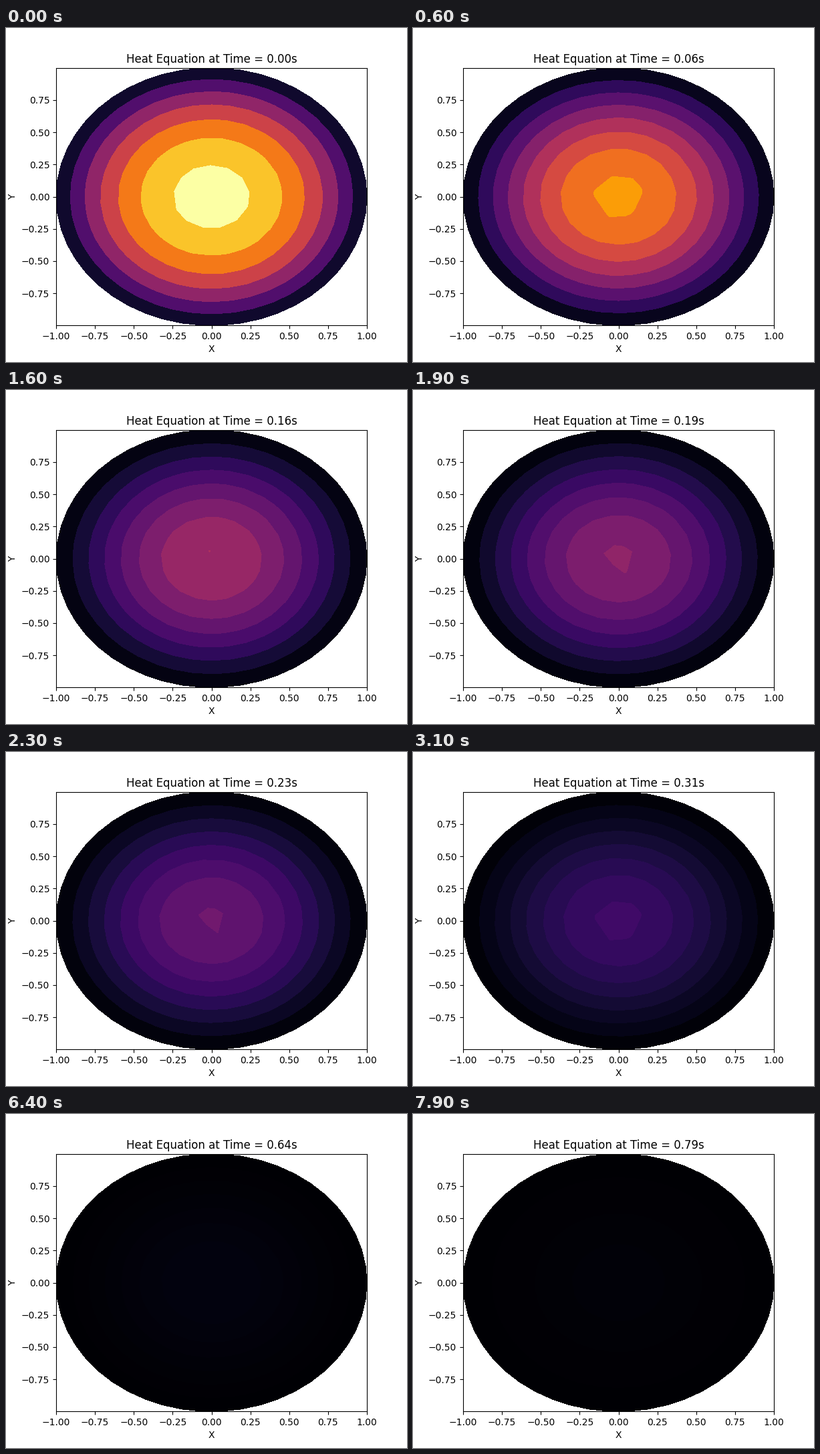
Recreate the animation shown at these times as a matplotlib script. Size 600 by 500 pixels, loop 8000 ms.

```python
import numpy as np
import matplotlib.pyplot as plt
from matplotlib.animation import FuncAnimation
from matplotlib.tri import Triangulation

DT = 0.01
STEPS = 80
RINGS = 8
STIFFNESS = 0.0053  # relative excess of the discrete first eigenvalue

THETA = (np.arange(200) + 0.5) * np.pi / 200


def bessel0(x):
    return np.cos(np.multiply.outer(x, np.sin(THETA))).mean(axis=-1)


def bessel1(x):
    s = np.sin(THETA)
    return (s * np.sin(np.multiply.outer(x, s))).mean(axis=-1)


def ring(radius, count, phase):
    a = phase + 2 * np.pi * np.arange(count) / count
    return radius * np.column_stack([np.cos(a), np.sin(a)])


def disk_points(rng):
    core = [(-0.015, 0.06), (0.045, -0.107), (0.125, 0.052), (0.09, 0.14),
            (-0.043, 0.172), (-0.14, 0.03), (-0.054, -0.147)]
    parts = [np.array(core)]
    for k in range(2, RINGS):
        count = round(2 * np.pi * k)
        pts = ring(k / RINGS, count, rng.uniform(0, 2 * np.pi))
        parts.append(pts + rng.uniform(-0.012, 0.012, pts.shape))
    rim = ring(1, round(2 * np.pi * RINGS), 0)
    return np.vstack(parts + [rim]), len(rim)


def bessel_zeros(count):
    z = (np.arange(1, count + 1) - 0.25) * np.pi
    for _ in range(6):
        z = z + bessel0(z) / bessel1(z)
    return z


points, rim_size = disk_points(np.random.default_rng(4))
mesh = Triangulation(points[:, 0], points[:, 1])

# Modes of u0 = 1 - r^2, damped by one backward Euler factor per step
zeros = bessel_zeros(12)
weights = 8 / (zeros**3 * bessel1(zeros))
modes = bessel0(np.multiply.outer(np.hypot(*points.T), zeros))
modes[-rim_size:] = 0
excess = 1 + STIFFNESS * (zeros / zeros[0])**2
damping = 1 / (1 + DT * zeros**2 * excess)


def heat(step):
    return modes @ (weights * damping**step)


peak = heat(1).max()
fig, ax = plt.subplots(figsize=(6, 5), dpi=100)


def update(i):
    ax.clear()
    ax.tricontourf(mesh, heat(i + 1), cmap="inferno", vmin=0, vmax=peak)
    ax.set_title(f"Heat Equation at Time = {i * DT:.2f}s")
    ax.set_xlabel("X")
    ax.set_ylabel("Y")


anim = FuncAnimation(fig, update, frames=STEPS, interval=100, repeat=True)
plt.show()
```
